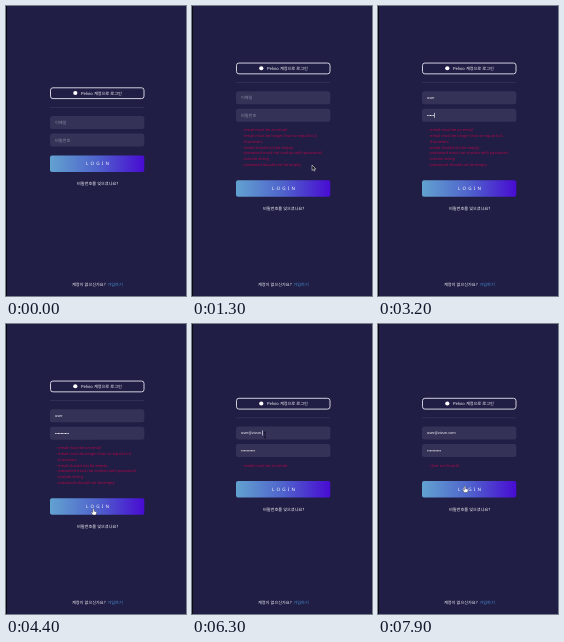
Write an HTML page that moves like this. It is 180x290 px and loops after 8 s.

```html
<!DOCTYPE html>
<html lang="ko">
<head>
<meta charset="utf-8">
<title>Login</title>
<style>
  html, body { margin: 0; width: 100%; height: 100%; overflow: hidden; background: #201e45; }
  svg { display: block; width: 180px; height: 290px; }
  text {
    font: 4.15px "Noto Sans CJK KR", "Noto Sans CJK", "Noto Sans", sans-serif;
    fill: #fff; text-rendering: geometricPrecision; white-space: pre;
  }
  .field { fill: #343257; }
  .value { font-size: 3.7px; }
  .hint { fill: #8f8da6; }
  .link { fill: #4a90d2; }
  .error text { font: 3.9px "Noto Sans", "Noto Sans CJK KR", sans-serif; fill: #b00848; }
  .login { font: 4.6px "Noto Sans", sans-serif; letter-spacing: 2.2px; }
</style>
</head>
<body>
<svg viewBox="0 0 180 290">
  <defs>
    <linearGradient id="grad">
      <stop offset="0" stop-color="#62a2d0"/>
      <stop offset=".5" stop-color="#4f63cc"/>
      <stop offset="1" stop-color="#480bd2"/>
    </linearGradient>
  </defs>
  <rect width="180" height="290" fill="#201e45"/>
  <rect width="1" height="290" fill="#08080f"/>

  <g id="top">
    <rect x="44.5" y="81.8" width="93.5" height="10.8" rx="2.4" fill="none" stroke="#e4e3ee" stroke-width=".9"/>
    <circle cx="69.3" cy="87" r="2.1" fill="#fff"/>
    <text x="75" y="88.6">Pelvio 계정으로 로그인</text>
    <rect x="44" y="101" width="94" height=".7" fill="#37355c"/>
    <rect class="field" x="44" y="110" width="94.3" height="13" rx="2.5"/>
    <rect class="field" x="44" y="127.6" width="94.3" height="13" rx="2.5"/>
    <text class="hint" id="mailHint" x="49" y="118">이메일</text>
    <text class="hint" id="passHint" x="49" y="135.6">비밀번호</text>
    <text class="value" id="mail" x="49" y="117.8"></text>
    <line id="dots" x1="49.7" y1="134.2" y2="134.2" stroke="#fff" stroke-width="1.15" stroke-linecap="round" stroke-dasharray="0 1.4"/>
    <rect id="caret" width=".6" height="5" fill="#fff"/>
    <g id="errors" class="error"></g>
  </g>

  <g id="bottom">
    <rect x="44" y="149.6" width="94.3" height="16.4" rx="2" fill="url(#grad)"/>
    <text class="login" x="80" y="159.3">LOGIN</text>
    <text x="71" y="179.2">비밀번호를 잊으셨나요?</text>
  </g>

  <text x="66" y="280">계정이 없으신가요?</text>
  <text class="link" x="101.5" y="280">가입하기</text>

  <g id="loader">
    <circle cx="91" cy="144.5" r="22" fill="#fff" opacity=".6"/>
    <g id="hat">
      <ellipse cx="92" cy="149.5" rx="4.2" ry="4.4" fill="#f4efef"/>
      <path d="M86.5 137.5Q94 136.500 97.500 147L87 148.500Q88.500 142 86.500 137.500Z" fill="#d5283c"/>
      <path d="M87 148.500L97.300 147" stroke="#fff" stroke-width="1.6" stroke-linecap="round"/>
      <circle cx="86.300" cy="137.700" r="1.400" fill="#fff"/>
    </g>
  </g>

  <g id="cursor">
    <path id="arrow" d="M0 0V5.400L1.300 4.300L2.100 6.100L3 5.700L2.200 3.900H3.900Z" fill="#111" stroke="#fff" stroke-width=".5"/>
    <path id="hand" d="M-.7 0Q0-.8.7 0V2.200L2.800 2.800Q3.300 3 3.100 3.800L2.400 6H-.7L-2.400 3.500Q-2.200 2.700-.7 3.500Z" fill="#fff" stroke="#222" stroke-width=".4"/>
    <path id="beam" d="M-1-3Q0-3 0-2Q0-3 1-3M0-2V2M-1 3Q0 3 0 2Q0 3 1 3" fill="none" stroke="#0c0b1c" stroke-width=".7"/>
  </g>
</svg>
<script>
const LOOP = 8000, STEP = 100;
const $ = id => document.getElementById(id);
const show = (id, on) => { $(id).style.display = on ? '' : 'none'; };
const clamp = v => Math.max(0, Math.min(1, v));
const ease = p => p * p * (3 - 2 * p);

const invalid = [
  '- email must be an email',
  '- email must be longer than or equal to 4',
  'characters',
  '- email should not be empty',
  '- password must not contain with password',
  'contain string',
  '- password should not be empty'
];

// Form states: start time, height of the error block, messages
const states = [
  [0, 0, []],
  [1300, 49.5, invalid],
  [4500, 15, invalid.slice(0, 1)],
  [7600, 15, ['- User not found!']]
];

// Pointer moves: start, end, from x, y, to x, y
const moves = [
  [100, 500, 134, 262, 130, 172],
  [600, 800, 130, 172, 120, 159],
  [1400, 1700, 120, 159, 85, 94],
  [3600, 4200, 85, 108, 87.5, 185],
  [4500, 4600, 87.5, 185, 87.5, 183],
  [4600, 5200, 87.5, 183, 73, 111],
  [6600, 7200, 73, 111, 87, 162.5]
];

const typed = (text, t, start, gap) =>
  text.slice(0, Math.max(0, Math.floor((t - start) / gap) + 1));

let shown;
function drawErrors(lines) {
  if (lines === shown) return;
  shown = lines;
  $('errors').innerHTML = lines.map((s, i) =>
    `<text x="${s[0] === '-' ? 50 : 51.5}" y="${150.2 + i * 5.75}">${s}</text>`).join('');
}

function drawFields(t) {
  const mail = typed('user', t, 2200, 150) + typed('@zivun.', t, 5500, 120) + typed('com', t, 6400, 100);
  const count = Math.max(0, Math.min(10, Math.floor((t - 2900) / 70) + 1));
  $('mail').textContent = mail;
  $('dots').setAttribute('x2', 49.75 + (count - 1) * 1.4);
  show('dots', count);
  show('mailHint', !mail);
  show('passHint', !count);

  const onMail = t >= 1900 && t < 2800 || t >= 5300 && t < 7300;
  const onPass = t >= 2800 && t < 4200;
  const blink = t % 1000 < 600;
  const width = onPass ? count * 1.4 : mail ? $('mail').getComputedTextLength() : 0;
  $('caret').setAttribute('x', 49.2 + width);
  $('caret').setAttribute('y', onPass ? 131.6 : 114);
  show('caret', (onMail || onPass) && blink);
}

function drawCursor(t, gap) {
  const [start, end, x0, y0, x1, y1] = moves.filter(m => t >= m[0]).pop() || moves[0];
  const p = ease(clamp((t - start) / (end - start)));
  const x = x0 + (x1 - x0) * p, y = y0 + (y1 - y0) * p;
  const up = y + gap / 2, down = y - gap / 2;
  const inForm = x > 44 && x < 138;
  const beam = inForm && (up > 110 && up < 123 || up > 127 && up < 141);
  const hand = inForm && !beam && (down > 149 && down < 166 || down > 174 && down < 181);
  show('beam', beam);
  show('hand', hand);
  show('arrow', !beam && !hand);
  show('cursor', t >= 100 && (t < 2200 || t >= 3600));
  $('cursor').setAttribute('transform', `translate(${x} ${y})`);
}

function draw(t) {
  const [, gap, lines] = states.filter(s => t >= s[0]).pop();
  $('top').setAttribute('transform', `translate(0 ${-gap / 2})`);
  $('bottom').setAttribute('transform', `translate(0 ${gap / 2})`);
  drawErrors(lines);
  drawFields(t);
  drawCursor(t, gap);
  show('loader', t >= 800 && t < 1300);
  $('hat').setAttribute('transform', `rotate(${8 * Math.sin((t - 1100) / 90)} 91 145)`);
}

const begin = performance.now();
function tick() {
  const t = (performance.now() - begin) % LOOP;
  draw(Math.floor(t / STEP) * STEP);
  requestAnimationFrame(tick);
}
tick();
</script>
</body>
</html>
```
